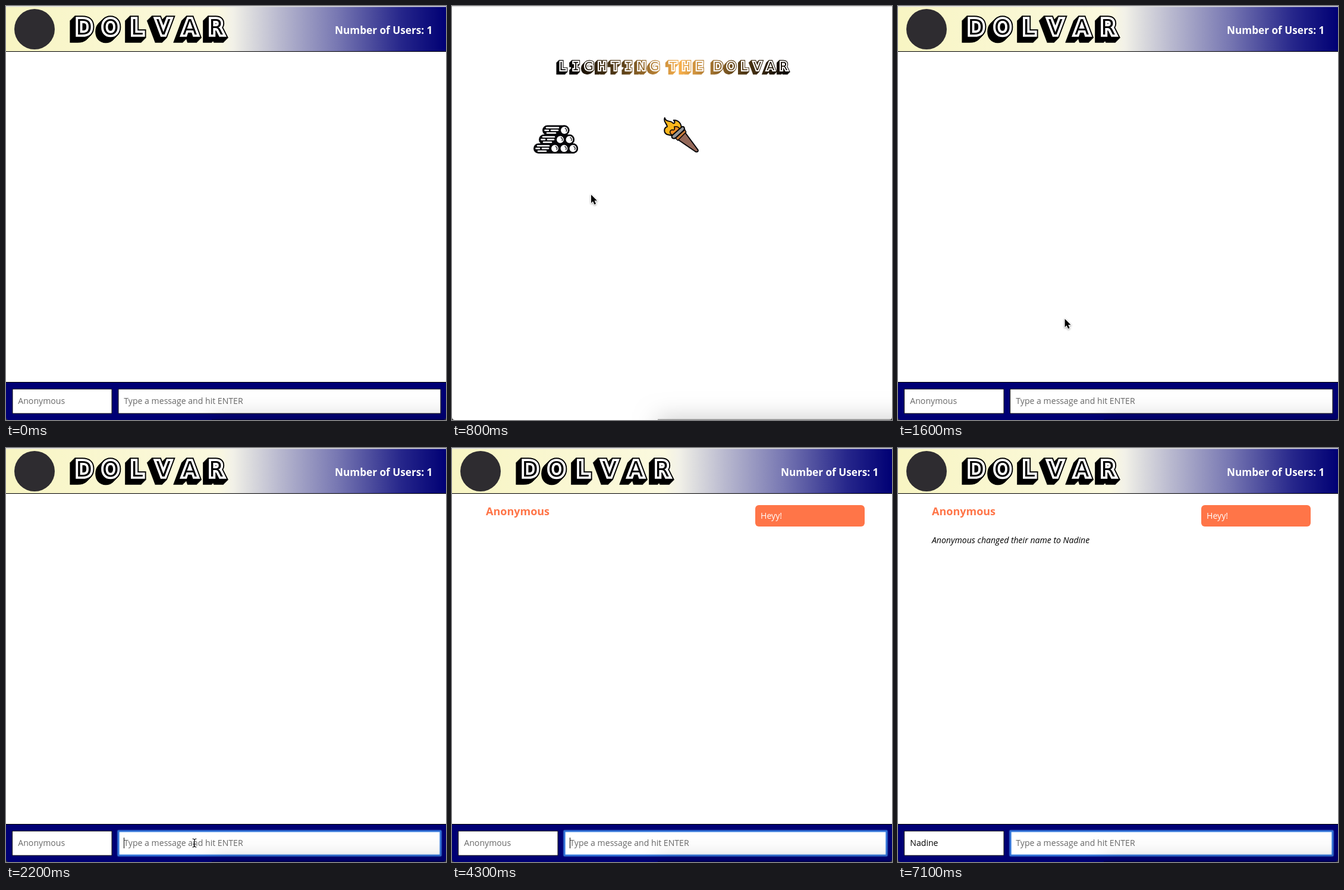
An HTML page with a canvas for the animation above (7200 ms loop, 740x696 px).

```html
<!DOCTYPE html>
<html lang="en">
<head>
<meta charset="utf-8">
<title>Chat demo</title>
<style>
  html, body { margin: 0; width: 100%; height: 100%; overflow: hidden; background: #fff; }
  canvas { display: block; }
</style>
</head>
<body>
<canvas id="stage" width="740" height="696"></canvas>
<script>
const ctx = document.getElementById('stage').getContext('2d');
const LOOP = 7200, BRAND = 'DOLVAR', USER = 'Nadine', GREETING = 'Heyy!';
const NAVY = '#000074', CORAL = '#ff7548', INK = '#050509';

// Moments of the story, in ms
const LOAD = 300, READY = 1500, FOCUS = 2000, TYPE = 2500, SEND = 3300,
      RENAME = 4400, TYPE_NAME = 4700, DONE = 6600;

const lerp = (a, b, k) => a + (b - a) * k;

function rect(x, y, w, h, color) {
  ctx.fillStyle = color;
  ctx.fillRect(x, y, w, h);
}

function text(str, x, y, size, color, style = '') {
  ctx.font = `${style} ${size}px "Open Sans", sans-serif`;
  ctx.fillStyle = color;
  ctx.fillText(str, x, y);
}

function shape(d, fill, line = 2) {
  const path = new Path2D(d);
  if (fill) {
    ctx.fillStyle = fill;
    ctx.fill(path);
  }
  if (line) {
    ctx.strokeStyle = INK;
    ctx.lineWidth = line;
    ctx.stroke(path);
  }
}

function gradient(x0, x1, stops) {
  const g = ctx.createLinearGradient(x0, 0, x1, 0);
  stops.forEach(([at, color]) => g.addColorStop(at, color));
  return g;
}

// Block capitals with a white inline and an extrusion to the lower left
function blockText(str, x, base, size, pitch, paint) {
  const letters = [];
  for (const char of str) {
    if (char !== ' ') letters.push([char, x + pitch / 2]);
    x += char === ' ' ? pitch * 0.41 : pitch;
  }
  const each = draw => letters.forEach(([char, cx]) => {
    ctx.font = `${size}px "DejaVu Sans${char === 'I' ? ' Mono' : ''}", sans-serif`;
    draw(char, cx);
  });
  ctx.save();
  ctx.textAlign = 'center';
  ctx.lineJoin = 'miter';
  ctx.miterLimit = 2;
  ctx.strokeStyle = paint;
  ctx.lineWidth = size * 0.33;
  for (let d = Math.round(size * 0.22); d >= 0; d--) {
    each((char, cx) => ctx.strokeText(char, cx - d, base + d));
  }
  ctx.strokeStyle = '#fff';
  ctx.lineWidth = size * 0.22;
  each((char, cx) => ctx.strokeText(char, cx, base));
  ctx.fillStyle = paint;
  each((char, cx) => ctx.fillText(char, cx, base));
  ctx.restore();
}

function log(left, y, ends) {
  const right = ends[ends.length - 1];
  const line = (x0, x1, ly) => {
    ctx.beginPath();
    ctx.moveTo(x0, ly);
    ctx.lineTo(x1, ly);
    ctx.stroke();
  };
  ctx.lineCap = 'round';
  ctx.strokeStyle = INK;
  ctx.lineWidth = 17;
  line(left + 8.5, right, y);
  ctx.strokeStyle = '#fff';
  ctx.lineWidth = 2.6;
  const edge = ends[0] - 10;
  line(left + 7, edge, y - 4.5);
  line(left + 4.5, left + 10, y);
  line(left + 15, edge - 1, y);
  line(left + 8, edge - 5, y + 4.5);
  ends.forEach(x => {
    ctx.beginPath();
    ctx.arc(x, y, 7.2, 0, 7);
    ctx.fillStyle = '#fff';
    ctx.fill();
    ctx.strokeStyle = INK;
    ctx.lineWidth = 2.6;
    ctx.stroke();
    ctx.lineWidth = 1.4;
    ctx.beginPath();
    ctx.arc(x, y, 3.6, -1.2, 0.5);
    ctx.stroke();
  });
}

function torch(x) {
  ctx.save();
  ctx.translate(x, 187);
  ctx.lineJoin = ctx.lineCap = 'round';
  shape('M22 36L35 24L58 55Q59 59 54 58Z', '#946859');
  shape('M20 35L36 21L38 25L24 39Z', '#c77b3b', 1.5);
  shape('M2 1C-1 8 7 12 6 16C0 18 0 26 6 29L15 31L30 18C30 10 24 4 17 5C20 8 19 11 16 10C13 5 4 9 2 1Z', '#fbb61c');
  shape('M15 30C9 27 10 22 15 21C17 23 20 20 18 16C24 15 28 18 27 22Z', '#ef8c22', 1.5);
  shape('M14 31L31 16Q34 15 35 18Q36 21 33 23L20 35Q16 37 14 34Z', '#949699');
  ctx.restore();
}

function loadingPage(t) {
  const x = lerp(356, 232, (t - 800) / 500);
  const glow = gradient(x - 165, x + 220, [
    [0, '#000'], [0.25, '#5c4119'], [0.5, '#f8b04c'], [0.75, '#5c4119'], [1, '#000']
  ]);
  blockText('LIGHTING THE ' + BRAND, 175, 108, 19, 22.1, glow);
  log(152, 209, [189]);
  log(146, 224.5, [182, 197.5]);
  log(137, 239.5, [173, 188.5, 203.5]);
  torch(x);
}

function header() {
  rect(0, 1, 740, 75, gradient(0, 740, [
    [0, '#f8f5c3'], [0.48, '#fbf9df'], [0.515, '#f2f1e8'], [0.55, '#dededf'],
    [0.62, '#b9b9cf'], [0.75, '#7979b3'], [0.9, '#25258a'], [1, '#000074']
  ]));
  rect(0, 76, 740, 1, '#000');
  ctx.fillStyle = '#2e2c30';
  ctx.beginPath();
  ctx.arc(48, 39, 34, 0, 7);
  ctx.fill();
  blockText(BRAND, 109, 47.5, 35, 44.5, '#000');
  text('Number of Users: 1', 553, 47, 17.2, '#fff', 'bold');
}

function field(x, w, value, hint, focusedAt, t) {
  const focused = focusedAt !== null;
  rect(x, 644, w, 41, '#fff');
  ctx.lineJoin = 'round';
  ctx.strokeStyle = focused ? '#2f70d6' : '#111';
  ctx.lineWidth = focused ? 2.6 : 1;
  if (focused) {
    ctx.shadowColor = '#4a94f0';
    ctx.shadowBlur = 2;
  }
  ctx.strokeRect(x, 644, w, 41);
  ctx.shadowBlur = 0;
  text(value || hint, x + 9.3, 669, 14.1, value ? '#000' : '#686868');
  if (focused && (t - focusedAt) % 1000 < 500) {
    const end = value ? ctx.measureText(value).width : 0;
    rect(x + 9 + end, 655, 1, 18, '#000');
  }
}

const keysDown = (str, start, pace, t) =>
  Math.max(0, Math.min(str.length, Math.floor((t - start) / pace) + 1));

function chatPage(t) {
  header();
  if (t >= SEND) {
    text('Anonymous', 57, 113, 18, CORAL, 'bold');
    ctx.fillStyle = CORAL;
    ctx.beginPath();
    ctx.roundRect(510, 96, 184, 36, 6);
    ctx.fill();
    text(GREETING, 519, 119, 14.1, '#fff');
  }
  if (t >= DONE) text(`Anonymous changed their name to ${USER}`, 57, 160, 14.1, '#000', 'italic');

  rect(0, 632, 740, 64, NAVY);
  rect(0, 632, 740, 1, '#000');

  // The caret restarts its blink at each focus and key press
  const nameKeys = keysDown(USER, TYPE_NAME, 130, t);
  const messageKeys = t < SEND ? keysDown(GREETING, TYPE, 150, t) : 0;
  const naming = t >= RENAME && t < DONE;
  const nameFocus = !naming ? null
    : nameKeys ? TYPE_NAME + (nameKeys - 1) * 130 : RENAME;
  const messageFocus = t < FOCUS || naming ? null
    : messageKeys ? TYPE + (messageKeys - 1) * 150
    : t < SEND ? FOCUS : t < DONE ? SEND : DONE;
  field(11, 167, USER.slice(0, nameKeys), 'Anonymous', nameFocus, t);
  field(189, 542, GREETING.slice(0, messageKeys), 'Type a message and hit ENTER', messageFocus, t);
}

function pointer(t) {
  const stops = [[500, 228, 276], [800, 234, 317], [1300, 244, 387], [1900, 317, 664], [TYPE, 317, 664]];
  const i = stops.findIndex(s => t < s[0]);
  if (i < 1) return;
  const [t0, x0, y0] = stops[i - 1], [t1, x1, y1] = stops[i];
  const k = (t - t0) / (t1 - t0), y = lerp(y0, y1, k);
  ctx.save();
  ctx.translate(lerp(x0, x1, k), y);
  if (y > 644) {
    shape('M-3 -7Q0 -7 0 -4V4Q0 7 -3 7M3 -7Q0 -7 0 -4M3 7Q0 7 0 4M-2 2H2', null, 1.1);
  } else {
    const arrow = new Path2D('M0 0V14L3 11L5.5 16.5L8 15.4L5.6 10H10Z');
    ctx.shadowColor = 'rgba(0,0,0,.4)';
    ctx.shadowBlur = 3;
    ctx.shadowOffsetY = 1;
    ctx.strokeStyle = '#fff';
    ctx.lineWidth = 2;
    ctx.stroke(arrow);
    ctx.shadowColor = 'transparent';
    ctx.fillStyle = '#000';
    ctx.fill(arrow);
  }
  ctx.restore();
}

function windowEdges() {
  ctx.save();
  ctx.shadowColor = 'rgba(0,0,0,.62)';
  ctx.shadowBlur = 38;
  rect(346, 694.5, 500, 30, 'rgba(0,0,0,.36)');
  ctx.restore();
  rect(0, 0, 740, 1.5, '#dedede');
  shape('M0 691Q0 696 5 696H0ZM740 691Q740 696 735 696H740Z', '#333', 0);
}

function frame(now) {
  const t = now % LOOP;
  rect(0, 0, 740, 696, '#fff');
  (t >= LOAD && t < READY ? loadingPage : chatPage)(t);
  windowEdges();
  pointer(t);
  requestAnimationFrame(frame);
}
requestAnimationFrame(frame);
</script>
</body>
</html>
```
